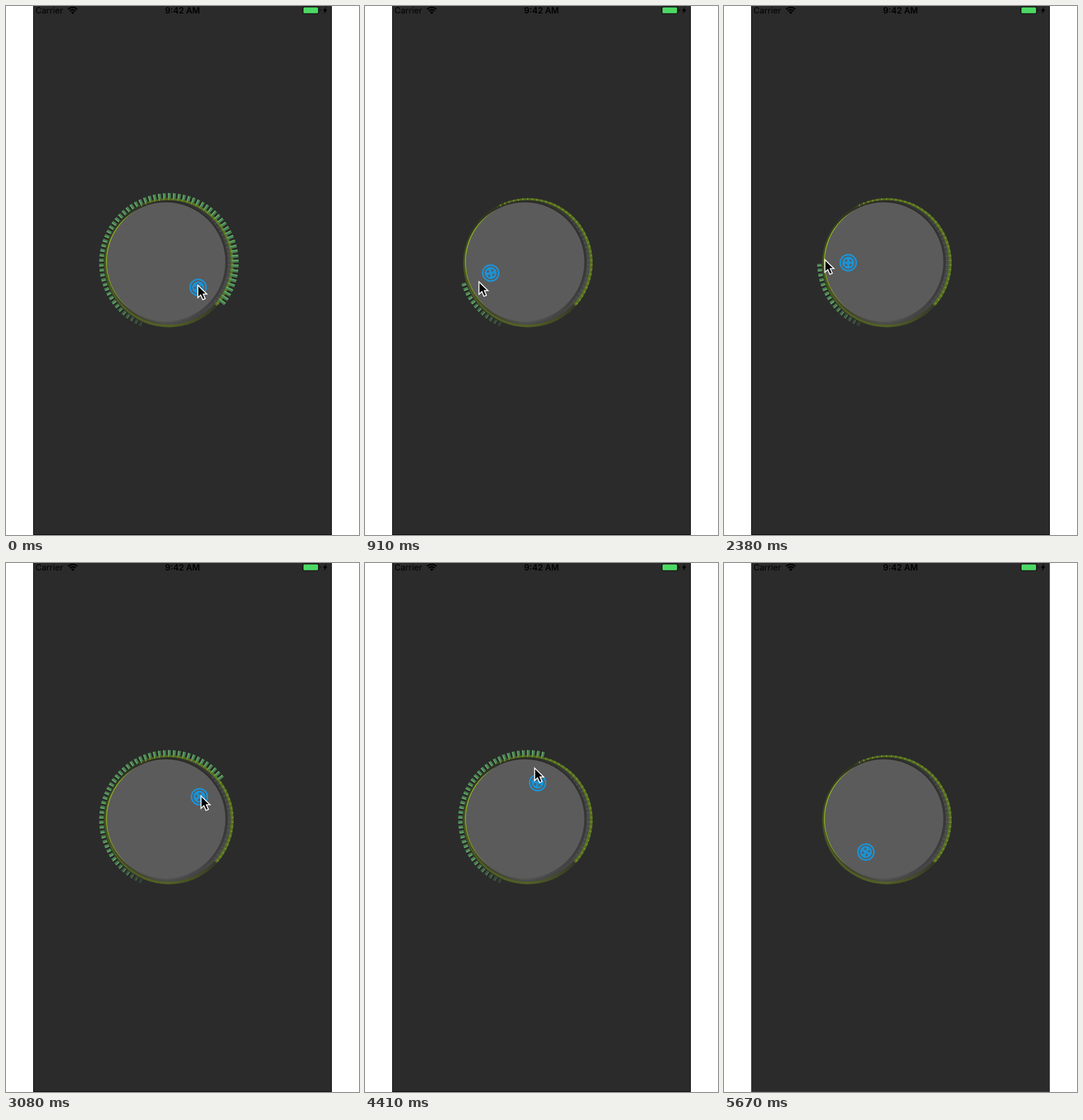
An HTML page with a canvas for the animation above (5740 ms loop, 611 by 917 pixels).

```html
<!DOCTYPE html>
<html lang="en">
<head>
<meta charset="utf-8">
<title>Rotary knob</title>
<style>
  html, body { margin: 0; width: 100%; height: 100%; overflow: hidden; background: #fff; }
  canvas, svg { position: absolute; left: 0; top: 0; }
  text { font-family: Inter, "Liberation Sans", sans-serif; font-size: 14.6px; }
</style>
</head>
<body>
<canvas id="stage" width="611" height="917"></canvas>
<svg width="611" height="20" viewBox="0 0 611 20">
  <text x="51" y="13.3">Carrier</text>
  <text x="305.5" y="13.3" text-anchor="middle" font-weight="600">9:42 AM</text>
  <g fill="none" stroke="#000" stroke-width="2.3">
    <path d="M107.5 5.8a11.2 11.2 0 0 1 16 0M110.3 8.7a7.2 7.2 0 0 1 10.4 0"/>
  </g>
  <path d="M112.4 10.7a4.4 4.4 0 0 1 6.2 0l-3.1 3.2z"/>
  <rect x="513.3" y="1.2" width="28.4" height="12.4" rx="3" fill="#262626" stroke="#141414" stroke-width=".9"/>
  <rect x="515" y="2.6" width="25" height="9.8" rx="1.5" fill="#4cd964"/>
  <path d="M543.8 5.5q2 2 0 4z"/>
  <path d="M554.5 1l-6 7.5h3.2l-1.6 5.5 6.2-7.8h-3.4z"/>
</svg>
<script>
const ctx = document.getElementById('stage').getContext('2d');
const LOOP = 5740, STEP = 70, TAU = Math.PI * 2;
const CX = 282, CY = 445, FIRST = 113.9, PITCH = 4.2, WIDTH = 2.3, MIN = 122.7;
const rad = deg => deg * Math.PI / 180;
const clamp = v => Math.max(0, Math.min(1, v));

// time, knob angle, pointer angle, pointer distance
const keys = [
  [0, 400, 396.8, 62], [490, 245.4, 244.9, 86], [840, 172, 168, 92],
  [1260, 126, 119, 84], [1470, MIN, 104.4, 78], [1680, MIN, 104.4, 78],
  [1890, MIN, 117, 84], [2100, MIN, 119, 85], [2380, 180, 183.7, 108],
  [3080, 323.2, 322, 70], [3640, 400, 398, 78], [3780, 400, 398, 78],
  [3990, 400, 404, 86], [4130, 394, 390, 88], [4410, 285, 277, 92],
  [4760, 202, 196, 94], [5320, 124, 106, 79], [5460, MIN, 99, 73], [LOOP, MIN, 99, 73]
];

function pose(t) {
  const i = keys.findIndex(k => k[0] > t);
  const a = keys[i - 1], b = keys[i], u = (t - a[0]) / (b[0] - a[0]);
  return a.map((v, n) => v + (b[n] - v) * u);
}

function disc(x, y, r, fill) {
  ctx.fillStyle = fill;
  ctx.beginPath();
  ctx.arc(x, y, r, 0, TAU);
  ctx.fill();
}

function sector(r0, r1, from, to, fill) {
  ctx.fillStyle = fill;
  ctx.beginPath();
  ctx.arc(CX, CY, r1, rad(from), rad(to));
  ctx.arc(CX, CY, r0, rad(to), rad(from), true);
  ctx.fill();
}

// moves the drawing origin to a point on a circle around the knob
function orbit(angle, dist) {
  ctx.translate(281.6 + dist * Math.cos(rad(angle)), CY + dist * Math.sin(rad(angle)));
}

// stops are given in degrees clockwise from the right
function conic(stops) {
  const g = ctx.createConicGradient(0, CX, CY);
  stops.forEach(([deg, color]) => g.addColorStop(deg / 360, color));
  return g;
}

const rimFill = conic([[0, '#566f20'], [42, '#566f20'], [42.2, '#343829'], [65, '#434c24'],
  [90, '#526024'], [125, '#4e5d24'], [180, '#465423'], [215, '#333a23'],
  [238, '#2f3322'], [255, '#4f651e'], [300, '#58721f'], [360, '#566f20']]);
const bevelFill = conic([[0, '#494949'], [40, '#464646'], [60, '#434343'], [95, '#4c4c4c'],
  [130, '#3e4126'], [180, '#3c4621'], [225, '#2b2c25'], [270, '#2c2d27'],
  [310, '#393939'], [360, '#494949']]);
const wallFill = conic([[0, '#373737'], [45, '#404040'], [90, '#545454'], [135, '#4c4f3c'],
  [180, '#343e1a'], [270, '#292a25'], [320, '#303030'], [360, '#373737']]);
const glowFill = conic([[0, '#8eb51f00'], [130, '#8eb51f00'], [165, '#789a20'],
  [195, '#8db324'], [215, '#86ab23'], [240, '#8eb51f00'], [360, '#8eb51f00']]);

function drawTicks(end) {
  for (let a = FIRST; a < end; a += PITCH) {
    const to = Math.min(a + WIDTH, end);
    const inner = 113 - 1.5 * clamp((a - 180) / 60) - 4 * clamp((a - 290) / 100);
    ctx.globalAlpha = 0.2 + 0.8 * clamp((a - FIRST) / 30);
    sector(inner, 120.7, a, to, '#4a8250');
    sector(inner, 120.7, a, Math.min(a + 0.6, to), '#70bf77');
  }
  ctx.globalAlpha = 1;
}

function drawKnob(angle, sliver) {
  disc(CX, CY, 112, rimFill);
  disc(281, 444.5, 108, bevelFill);
  for (let a = FIRST + 31 * PITCH; a < 402; a += PITCH) {
    sector(108.5, 112, a, a + 0.8, '#7a9b28');
    if (a > 312) sector(102, 108, a, a + 0.6, '#5b5b5b');
  }
  if (angle > MIN + 0.1) drawTicks(angle - 1);
  else if (sliver) sector(111, 119, FIRST, FIRST + 0.5, '#37583a');
  disc(279, 444, 105, wallFill);
  disc(276.5, 443.5, 103.2, '#5b5b5b');
  ctx.strokeStyle = glowFill;
  ctx.lineWidth = 1.7;
  ctx.beginPath();
  ctx.arc(276.8, 443.5, 103, rad(130), rad(240));
  ctx.stroke();
}

function drawHandle(angle) {
  ctx.save();
  orbit(angle, 66.5);
  ctx.rotate(rad(angle));
  ctx.strokeStyle = '#1b93d6';
  ctx.lineWidth = 2.7;
  ctx.beginPath();
  ctx.arc(0, 0, 13.8, 0, TAU);
  ctx.stroke();
  disc(0, 0, 10.4, '#1b93d6');
  for (let i = 0; i < 4; i++) {
    const a = rad(45 + i * 90);
    disc(5.4 * Math.cos(a), 5.4 * Math.sin(a), 2.3, '#4f6470');
  }
  ctx.restore();
}

const arrow = new Path2D('M.8 1.8V23.5L5.8 18.8 9.4 27 13.6 25.2 10.1 17.2H16.4Z');

function drawPointer(angle, dist) {
  ctx.save();
  orbit(angle, dist);
  ctx.fillStyle = '#000';
  ctx.strokeStyle = '#fff';
  ctx.lineWidth = 1.7;
  ctx.fill(arrow);
  ctx.stroke(arrow);
  ctx.restore();
}

function draw(t) {
  const [, angle, pointerAngle, dist] = pose(t);
  const held = t < 5600;
  ctx.fillStyle = '#fff';
  ctx.fillRect(0, 0, 611, 917);
  ctx.fillStyle = held ? '#050505' : '#3c3c3c';
  ctx.fillRect(47, 0, 517, 917);
  ctx.fillStyle = '#2b2b2b';
  ctx.fillRect(48, 0, 515, 916);
  drawKnob(angle, held);
  drawHandle(angle);
  if (held) drawPointer(pointerAngle, dist);
}

const start = performance.now();
function tick() {
  const t = (performance.now() - start) % LOOP;
  draw(Math.floor(t / STEP) * STEP);
  requestAnimationFrame(tick);
}
tick();
</script>
</body>
</html>
```
